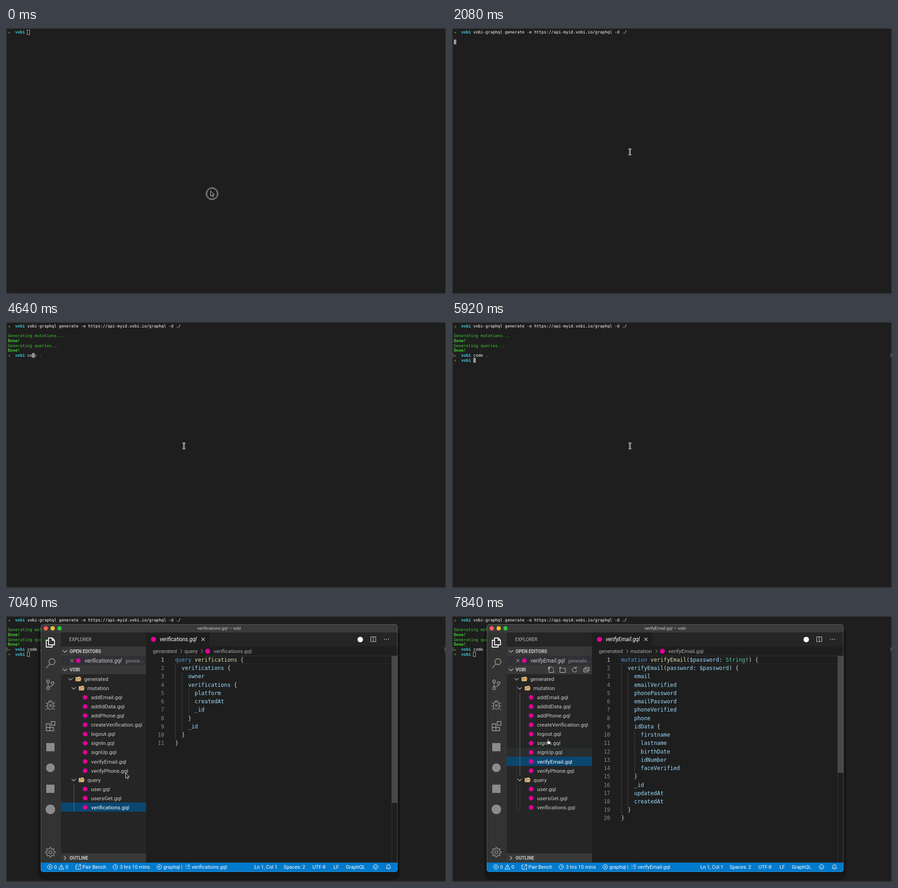
These frames come from a looping animation (962 by 582 pixels, 8 s). An HTML page with a canvas:

```html
<!DOCTYPE html>
<html lang="en">
<head>
<meta charset="utf-8">
<title>Terminal and editor</title>
<style>
html, body { margin: 0; width: 100%; height: 100%; overflow: hidden; background: #1e1e1e; }
canvas { display: block; }
</style>
</head>
<body>
<canvas id="stage" width="962" height="582"></canvas>
<script>
const ctx = document.getElementById('stage').getContext('2d');
const LOOP = 8000;
const UI = 'Roboto, sans-serif', MONO = '"DejaVu Sans Mono", monospace';
const PINK = '#e10098', GREY = '#8b8b8b', TEXT = '#cccccc';
const COMMAND = 'vobi-graphql generate -e https://api-myid.vobi.io/graphql -d ./';

// ---- drawing helpers ----
function text(str, x, y, color, size, family = UI, style = '', align = 'left') {
  ctx.font = `${style} ${size}px ${family}`;
  ctx.fillStyle = color;
  ctx.textAlign = align;
  ctx.fillText(str, x, y);
}
function rect(x, y, w, h, color) {
  ctx.fillStyle = color;
  ctx.fillRect(x, y, w, h);
}
function roundRect(x, y, w, h, r) {
  ctx.beginPath();
  ctx.roundRect(x, y, w, h, r);
}
function disc(x, y, r, color) {
  ctx.fillStyle = color;
  ctx.beginPath();
  ctx.arc(x, y, r, 0, 7);
  ctx.fill();
}
// Strokes and optionally fills SVG path data placed at x, y.
function path(d, x, y, stroke, width = 1, fill) {
  const shape = new Path2D(d);
  ctx.save();
  ctx.translate(x, y);
  if (fill) { ctx.fillStyle = fill; ctx.fill(shape); }
  if (stroke) { ctx.strokeStyle = stroke; ctx.lineWidth = width; ctx.stroke(shape); }
  ctx.restore();
}
const ring = r => `M${r} 0A${r} ${r} 0 1 1 ${-r} 0A${r} ${r} 0 1 1 ${r} 0Z`;
const CROSS = 'M-3.5-3.5L3.5 3.5M3.5-3.5L-3.5 3.5';
const DOWN = 'M-4.5-2L0 2.5 4.5-2', RIGHT = 'M-2-4L2 0-2 4';

// ---- terminal ----
const CELL = 5.327, ROW = 10.63;
const col = c => 4 + c * CELL;
const term = (str, c, row, color = '#fff', style = '') =>
  text(str, col(c), 12.2 + row * ROW, color, 8.85, MONO, style);

function prompt(row) {
  text('➜', 4, 12 + row * ROW, '#43d132', 6.3, '"DejaVu Sans", sans-serif');
  term('vobi', 3, row, '#3fc6d8', 'bold');
}
function block(c, row, hollow) {
  const y = 4 + row * ROW;
  if (hollow) {
    ctx.strokeStyle = '#b0b0b0';
    ctx.lineWidth = 1;
    ctx.strokeRect(Math.round(col(c)) - .5, Math.round(y) + .5, 5, 10);
  } else rect(col(c), y, CELL, 10.6, '#9b9b9b');
}
// A typed beginning, followed by the dim suggestion under the cursor block.
function typing(str, count, row) {
  term(str.slice(0, count), 8, row);
  term(str.slice(count), 8 + count, row, '#8c8c8c');
  block(8 + count, row);
}
function steps(t, list) {
  return list.reduce((value, [start, next]) => t >= start ? next : value, 0);
}
function terminal(t) {
  rect(0, 0, 962, 582, '#1e1e1e');
  ctx.strokeStyle = '#4a4a4a';
  ctx.lineWidth = 1;
  ctx.strokeRect(.5, .5, 961, 580.5);
  prompt(0);
  if (t < 640) return block(8, 0, t < 320);
  if (t < 1440) return typing(COMMAND, steps(t, [[640, 1], [800, 3], [960, 4]]), 0);
  term(COMMAND, 8, 0);
  if (t < 2880) return block(0, t < 2080 ? 1 : 2);
  term('Generating mutations...', 0, 2, '#40c833');
  term('Done!', 0, 3, '#43d132', 'bold');
  term('Generating queries...', 0, 4, '#40c833');
  term('Done!', 0, 5, '#43d132', 'bold');
  prompt(6);
  if (t < 4640) return block(8, 6);
  if (t < 5600) return typing('code .', steps(t, [[4640, 2], [4800, 4], [4960, 5], [5120, 6]]), 6);
  term('code .', 8, 6);
  text('[', 0, 76, '#a0a0a0', 8.85, MONO);
  text(']', 957, 76, '#a0a0a0', 8.85, MONO);
  if (t < 5920) return block(0, 7);
  prompt(7);
  block(8, 7, t >= 6240);
}

// ---- editor ----
const TREE = ['generated', 'mutation', 'addEmail', 'addIdData', 'addPhone', 'createVerification',
  'logout', 'signIn', 'signUp', 'verifyEmail', 'verifyPhone', 'query', 'user', 'usersGet', 'verifications'];
const treeY = i => 137.8 + i * 20.06;

const QUERY = `query verifications {
  verifications {
    owner
    verifications {
      platform
      createdAt
      _id
    }
    _id
  }
}`;
const MUTATION = `mutation verifyEmail($password: String!) {
  verifyEmail(password: $password) {
    email
    emailVerified
    phonePassword
    emailPassword
    phoneVerified
    phone
    idData {
      firstname
      lastname
      birthDate
      idNumber
      faceVerified
    }
    _id
    updatedAt
    createdAt
  }
}`;

function activityBar() {
  rect(76, 36, 44, 504, '#333333');
  const icon = (d, y, color = GREY, width = 1.8) => path(d, 97, y, color, width);
  icon('M-4-10H4L9-5V5H-4ZM4-10V-5H9M-4-5H-9V10H4V5', 58, '#fff');
  icon('M10-4A6.5 6.5 0 1 1-3-4A6.5 6.5 0 1 1 10-4ZM-1.5 1L-9 10', 104);
  icon('M-2-7A3 3 0 1 1-8-7A3 3 0 1 1-2-7ZM-2 8A3 3 0 1 1-8 8A3 3 0 1 1-2 8ZM8-3A3 3 0 1 1 2-3A3 3 0 1 1 8-3ZM-5-4V5M5 0Q5 4-4 5', 150);
  icon('M-6 0Q-6-7 0-7Q6-7 6 0V3Q6 9 0 9Q-6 9-6 3ZM-4-6Q-3-10 0-10Q3-10 4-6M-6-2L-10-6M6-2L10-6M-6 2H-11M6 2H11M-5 6L-10 10M5 6L10 10M-3-2L3 4M3-2L-3 4', 195, GREY, 1.5);
  icon('M-9-5H-1V3H7V10H-9ZM-9 3H-1V10M2-10H10V-2H2Z', 241);
  rect(88, 278, 18, 18, GREY);
  disc(97, 332, 9.5, GREY);
  rect(88, 369, 18, 18, GREY);
  disc(97, 423, 10.5, GREY);
  let gear = ring(3.2) + 'M';
  for (let i = 0; i < 32; i++) {
    const r = i % 4 < 2 ? 10.5 : 7.5, a = (i - .5) * Math.PI / 16;
    gear += `${i ? 'L' : ''}${r * Math.cos(a)} ${r * Math.sin(a)}`;
  }
  icon(gear + 'Z', 517, GREY, 1.6);
}

function header(label, y, chevron) {
  rect(120, y - 10, 186, 20, '#383838');
  path(chevron, 129, y, TEXT, 1.1);
  text(label, 139, y + 3.7, TEXT, 10, UI, 'bold');
}
function sidebar(file, hovered, focused, folder) {
  rect(120, 36, 186, 504, '#252526');
  text('EXPLORER', 138, 55, '#bbbbbb', 10.1);
  header('OPEN EDITORS', 77, DOWN);
  rect(120, 87, 186, 20.5, '#303036');
  path(CROSS, 144, 97.5, TEXT);
  disc(158, 97.5, 5, PINK);
  text(file + '.gql', 172, 101.5, TEXT, 11.8, UI, 'italic');
  const short = file === 'verifyEmail';
  text(short ? 'generate...' : 'genera...', short ? 254 : 261, 101.5, '#929292', 10.7, UI, 'italic');
  header('VOBI', 117.5, DOWN);
  if (focused) {
    path('M-2-6H-5V6H5V1M-5-3V-6H2L5-3V-1M-8-3H-2M-5-6V0', 217, 117.5, TEXT);
    path('M-6-2V6H6V-3H0L-2-5M-8-4H-3M-5.5-6.5V-1.5', 242, 117.5, TEXT);
    path('M4-3A5 5 0 1 0 5 1M4-7V-3H0', 268, 117.5, TEXT);
    path('M-6-2H3V5H-6ZM-3-2V-5H6V2H3M-4 1.5H1', 294, 117.5, TEXT);
  }
  TREE.forEach((name, i) => {
    const y = treeY(i), isFolder = i < 2 || name === 'query', left = i ? 148 : 141;
    const top = Math.round(y - 10.4);
    if (name === file) rect(120, top, 186, 20, '#094771');
    else if (name === hovered) rect(120, top, 186, 20, '#2a2d2e');
    if (isFolder) {
      path(DOWN, left, y, TEXT, 1.1);
      path('M-6 5V-4H-1L0-5H5V-2H7L5 5Z', left + 17, y, null, 1, '#dcb67a');
      path('M-4 3.5L-2.5-.8H5.5', left + 17, y, '#7d6543', 1);
    } else disc(173, y, 5, PINK);
    text(isFolder ? name : name + '.gql', isFolder ? left + 30 : 186, y + 4.2,
      name === file ? '#fff' : TEXT, 11.8);
  });
  const guide = (x, first, last, active) =>
    rect(x, treeY(first) - 10, 1, (last - first + 1) * 20.06, active ? '#6a6a6a' : '#3b3b3b');
  if (focused) { guide(141, 1, 14); guide(148, 2, 10, folder === 'mutation'); }
  if (focused || folder === 'query') guide(148, 12, 14, folder === 'query');
  header('OUTLINE', 529.5, RIGHT);
}

function codeLine(line, i) {
  const y = 99.9 + i * 18.24, advance = 7.146, size = 11.87;
  text(i + 1, 346, y, i ? '#858585' : '#c6c6c6', size, MONO, '', 'right');
  const indent = line.search(/\S/);
  for (let c = 0; c < indent; c += 2) rect(370 + Math.round(c * advance), y - 13, 1, 18.3, '#404040');
  for (const { 0: word, index } of line.matchAll(/\$?\w+|[^\s\w$]+/g)) {
    const color = /^\W+$/.test(word) ? '#d4d4d4'
      : /^(query|mutation)$/.test(word) ? '#569cd6'
      : word === 'String' ? '#4ec9b0'
      : !i && word[0] !== '$' ? '#dcdcaa' : '#9cdcfe';
    text(word, 369.7 + index * advance, y, color, size, MONO);
  }
}
function editorPane(file, folder, scrollbar) {
  const mutation = folder === 'mutation', tabEnd = mutation ? 438 : 445;
  rect(306, 36, 550, 504, '#1e1e1e');
  rect(tabEnd, 36, 856 - tabEnd, 30.5, '#252526');
  disc(322.5, 51, 5.6, PINK);
  text(file + '.gql', 336, 55.3, '#fff', 11.8, UI, 'italic');
  path(CROSS, tabEnd - 14, 51, TEXT, 1.2);
  disc(774.5, 51.5, 6, '#fff');
  path('M-5.5-5H5.5V5.5H-5.5ZM0-5V5.5', 803, 50.5, TEXT, 1.1);
  for (const x of [827.5, 832, 836.5]) disc(x, 51, 1, TEXT);

  const crumb = (str, x) => text(str, x, 81.2, '#a9a9a9', 11.8);
  const second = mutation ? 447 : 428;
  crumb('generated', 321);
  path(RIGHT, 383, 77, '#a9a9a9');
  crumb(folder, 390);
  path(RIGHT, second, 77, '#a9a9a9');
  disc(second + 13, 77, 5.4, PINK);
  crumb(file + '.gql', second + 26);

  rect(363, 87, 493, 1, '#303030');
  rect(363, 104, 493, 1, '#303030');
  rect(843, 87, 1, 453, '#333');
  (mutation ? MUTATION : QUERY).split('\n').forEach(codeLine);
  if (scrollbar) rect(843, 87, 13, mutation ? 256 : 322, '#484848');
}
function statusBar(file) {
  const put = (str, x) => text(str, x, 553, '#fff', 10.9);
  const icon = (d, x) => path(d, x, 549, '#fff', 1);
  const error = ring(5) + 'M-2-2L2 2M2-2L-2 2';
  icon(error, 96); put('0', 105);
  icon('M0-5L5.5 5H-5.5ZM0-1.5V2M0 3V4', 121); put('0', 130);
  icon('M-1-4H-5V5H5V1M1-5H5.5V-.5M5-4.5L-1 1.5', 158); put('Pair Bench', 167);
  icon(ring(5) + 'M0-3V0H3', 239); put('3 hrs 10 mins', 249);
  icon(error, 335); put('graphql |', 344);
  icon('M-5-4H-3M-1-4H5M-5-1H-3M-1-1H5M-5 3H-3M-1 3H5', 397.5); put(file + '.gql', 406);
  put('Ln 1, Col 1', 543); put('Spaces: 2', 607); put('UTF-8', 670);
  put('LF', 716); put('GraphQL', 743);
  icon(ring(5) + 'M-2.5 1Q0 4 2.5 1M-2-2V-.7M2-2V-.7', 808);
  icon('M-5 3H5L3.5 1V-1Q3.5-5 0-5Q-3.5-5-3.5-1V1ZM-1 5H1', 836);
}
function editor(t) {
  const opened = t >= 7680;
  const file = opened ? 'verifyEmail' : 'verifications';
  const folder = opened ? 'mutation' : 'query';
  const hovered = t >= 7840 ? 'signUp' : t >= 7360 ? 'verifyEmail' : '';

  // A flat, nearly hard-edged shadow that reaches furthest below the window.
  ctx.fillStyle = 'rgba(0,0,0,.28)';
  roundRect(70, 24, 792, 554, 16);
  ctx.fill();

  ctx.save();
  roundRect(76, 18, 780, 542, 5);
  ctx.clip();
  rect(76, 18, 780, 18, '#3a3a3a');
  ['#ff5f57', '#ffbd2e', '#28c940'].forEach((color, i) => disc(87 + 15 * i, 27, 4.7, color));
  text(file + '.gql — vobi', 466, 30.3, TEXT, 9.4, UI, '', 'center');
  activityBar();
  sidebar(file, hovered, t >= 7200, folder);
  editorPane(file, folder, t >= 6400);
  rect(76, 539.5, 780, 20.5, '#007acc');
  statusBar(file);
  ctx.restore();

  ctx.strokeStyle = 'rgba(255,255,255,.2)';
  ctx.lineWidth = 1;
  roundRect(76.5, 18.5, 779, 541, 5);
  ctx.stroke();
}

// ---- mouse ----
const ARROW = 'M0 0V11.2L2.6 8.8 4.3 12.8 6.3 12 4.6 8H8Z';
const BEAM = 'M-3-6Q0-6 0-4Q0-6 3-6M0-4V5M-3 6Q0 6 0 4Q0 6 3 6';
const HAND = 'M-2.2-5Q-1.2-6.5-.2-5V-1.5L3.5-.6Q5-.2 4.6 1.5L3.8 5.5H-1.2L-4.6 1.2Q-4.6-.6-2.2 1Z';
const TRACK = [
  [0, 'ringed', 447.5, 356.5], [160, 'bold', 389, 271], [6240, 'beam', 388, 271],
  [6400, 'beam', 396, 270], [6720, 'beam', 387, 267], [7040, 'arrow', 261.5, 343.5],
  [7200, 'arrow', 257, 405], [7360, 'hand', 212, 325], [7520, 'hand', 210, 321],
  [7680, 'hand', 210, 305], [7840, 'hand', 211, 275],
];
function mouse(t) {
  const [, kind, x, y] = TRACK.findLast(([start]) => t >= start);
  if (kind === 'ringed') {
    path(ring(13.3), 450.5, 362.5, '#d8d8d8', .8);
    path(ring(11.4), 450.5, 362.5, '#d8d8d8', .8);
  }
  if (kind === 'ringed' || kind === 'arrow') path(ARROW, x, y, '#f0f0f0', .9, '#1a1a1a');
  if (kind === 'bold') {
    path(BEAM + 'M-1.5 0H1.5', x, y, '#e8e8e8', 3);
    path(BEAM, x, y, '#1e1e1e', .9);
  }
  if (kind === 'beam') path(BEAM + 'M-1.5 2.5H1.5', x, y, '#e8e8e8', 1);
  if (kind === 'hand') path(HAND, x, y, '#111', 1, '#fff');
}

function frame() {
  const t = performance.now() % LOOP;
  terminal(t);
  if (t >= 6240) editor(t);
  mouse(t);
  requestAnimationFrame(frame);
}
frame();
</script>
</body>
</html>
```
